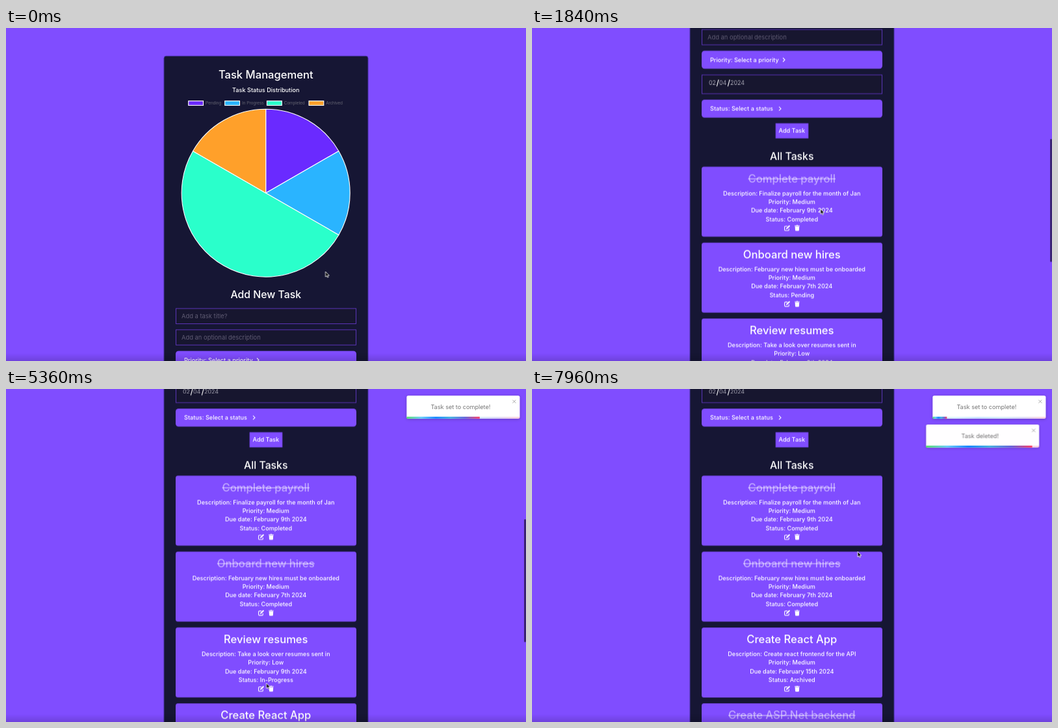
These frames come from a looping animation (800x514 px, 8000 ms). An HTML page:

```html
<!DOCTYPE html>
<html lang="en">
<head>
<meta charset="utf-8">
<title>Task Management</title>
<style>
  html, body { margin: 0; width: 100%; height: 100%; overflow: hidden; background: #804dff; }
  svg { display: block; width: 100vw; height: 100vh; }
  text { font: 500 9.15px Inter, sans-serif; fill: #fff; }
  .mid { text-anchor: middle; }
  .h1 { font-size: 16.6px; }
  .h2 { font-size: 15.8px; }
  .name { font-size: 16.6px; }
  .done { fill-opacity: .5; text-decoration: line-through; text-decoration-thickness: 1px; }
  .hint { font-size: 9.4px; font-weight: 400; fill: #5f5b73; }
  .date { font-size: 8.9px; font-weight: 400; fill: #a3a2b0; }
  .slash { font-size: 12px; }
  .legend { font: 6.6px "Liberation Sans", sans-serif; fill: #626270; }
  .ask { font: 7.9px "Liberation Sans", sans-serif; fill: #333; }
  .act { font: 8px "Liberation Sans", sans-serif; fill: #1a73e8; }
  .bold { font-weight: 700; }
  .note { fill: #757575; font-weight: 400; }
  .field { fill: #17162f; stroke: #5a34b6; }
  .fill { fill: #804dff; }
</style>
</head>
<body>
<svg id="stage" viewBox="0 0 800 514" preserveAspectRatio="none"></svg>
<script>
const LOOP = 8000;
const HOLD = 'steps(1)';
const PANEL = '#161634';

const text = (x, y, str, cls = '') => `<text x="${x}" y="${y}" class="${cls}">${str}</text>`;
const mid = (y, str, cls = '') => text(399.8, y, str, 'mid ' + cls);
const rect = (x, y, w, h, attrs = '') =>
  `<rect x="${x}" y="${y}" width="${w}" height="${h}" ${attrs}/>`;
const group = (id, body) => `<g id="${id}">${body}</g>`;
const at = (x, y, body) => `<g transform="translate(${x} ${y})">${body}</g>`;

// Chart
const slices = [
  ['Pending', 1, '#6a2aff', 280.7],
  ['In Progress', 1, '#2ab4ff', 336.7],
  ['Completed', 3, '#2affcb', 401.5],
  ['Archived', 1, '#ffa02a', 466]
];

function chart() {
  const r = 129.5;
  let sum = 0, out = '';
  const point = n => {
    const a = n * Math.PI / 3;
    return `${r * Math.sin(a)} ${-r * Math.cos(a)}`;
  };
  for (const [label, n, color, x] of slices) {
    out += rect(x, 112.6, 22.8, 6.8, `fill="${color}" stroke="#fff" stroke-width="1.1"`);
    out += text(x + 26.2, 118.3, label, 'legend');
    out += at(399.7, 254.7, `<path d="M0 0L${point(sum)}A${r} ${r} 0 0 1 ${point(sum + n)}Z"
      fill="${color}" stroke="#fff" stroke-width="1.1" stroke-linejoin="round"/>`);
    sum += n;
  }
  return out;
}

// Form
const chevron = (x, y) =>
  `<path d="M${x} ${y - 3}l3 3l-3 3" fill="none" stroke="#fff" stroke-width="1.1"/>`;
const picker = (y, label, x) =>
  rect(261, y, 278, 27.8, 'rx="4.5" class="fill"') + text(274, y + 17, label) + chevron(x, y + 14);
const field = (y, h) => rect(261.5, y, 277, h, 'class="field"');

const form = () =>
  mid(417, 'Add New Task', 'h2') +
  field(433, 23.5) + text(270, 447.8, 'Add a task title?', 'hint') +
  field(465.8, 23.5) + text(270, 480.7, 'Add an optional description', 'hint') +
  picker(498.5, 'Priority: Select a priority', 386) +
  field(535.8, 29) +
  text(272, 550.9, '02', 'date') + text(283.6, 551.8, '/', 'slash') +
  text(288, 550.9, '04', 'date') + text(300.5, 551.8, '/', 'slash') +
  text(305, 550.9, '2024', 'date') +
  picker(573.9, 'Status: Select a status', 380) +
  rect(375, 610.8, 50, 22.6, 'class="fill" stroke="#6a40d8" stroke-width=".8"') +
  mid(625.3, 'Add Task');

// Task cards
const icons =
  `<g transform="translate(392.5 94.5)">
    <path d="M.5-2.8H-2.6Q-3.9-2.8-3.9-1.5V2.6Q-3.9 3.9-2.6 3.9H1.5Q2.8 3.9 2.8 2.6V.8"
      fill="none" stroke="#fff" stroke-width="1.1"/>
    <path d="M-1.6 1.8L-1.2-.1L2.6-3.9Q3.3-4.6 4-3.9Q4.8-3.1 4.1-2.4L.3 1.4Z" fill="#fff"/>
  </g>
  <path transform="translate(407.9 94.5)" fill="#fff" d="M-3.8-3.8H-1.4L-1-4.5H1L1.4-3.8H3.8V-2.7H-3.8Z
    M-3.3-2.1H3.3L2.9 3.7Q2.8 4.5 2 4.5H-2Q-2.8 4.5-2.9 3.7Z"/>`;

function card(slot, name, about, priority, due, status) {
  const lines = [
    'Description: ' + about, 'Priority: ' + priority,
    `Due date: February ${due} 2024`, 'Status: ' + status
  ];
  return at(0, 677.6 + 117.1 * slot,
    rect(261, 0, 278, 108, 'rx="3.5" class="fill"') +
    mid(24, name, status === 'Completed' ? 'name done' : 'name') +
    lines.map((line, i) => mid(44 + 13.4 * i, line)).join('') + icons);
}

const hires = status =>
  card(1, 'Onboard new hires', 'February new hires must be onboarded', 'Medium', '7th', status);

const cards = () =>
  mid(666.7, 'All Tasks', 'h2') +
  card(0, 'Complete payroll', 'Finalize payroll for the month of Jan', 'Medium', '9th', 'Completed') +
  group('open', hires('Pending')) +
  group('closed', hires('Completed')) +
  group('review', card(2, 'Review resumes', 'Take a look over resumes sent in', 'Low', '9th', 'In-Progress')) +
  group('rest',
    card(3, 'Create React App', 'Create react frontend for the API', 'Medium', '15th', 'Archived') +
    card(4, 'Create ASP.Net backend', 'Create backend for the app', 'Medium', '8th', 'Completed'));

// Overlays
const toast = (id, y, str) => group(id, at(616.4, y,
  rect(0, 0, 174, 35.5, 'rx="2.5" fill="#fff" filter="url(#shadow)"') +
  text(83, 20.7, str, 'mid note') +
  '<path d="M163 6.6l5 5m0-5l-5 5" stroke="#aaa" stroke-width="1"/>' +
  rect(0, 32.7, 174, 2.8, 'fill="url(#rainbow)" opacity=".2"') +
  rect(0, 32.7, 174, 2.8, `fill="url(#rainbow)" id="${id}Bar"`)));

const dialog = () =>
  rect(0, 0, 800, 514, 'fill="#000" opacity=".43"') +
  rect(277.3, 208, 245.4, 55, 'rx="4" fill="#fff" filter="url(#shadow)"') +
  rect(277.3, 240.5, 245.4, 1, 'fill="#dcdce0"') +
  text(291, 227.9, 'Are you sure you wish to delete this task?', 'ask') +
  text(456, 255, 'Cancel', 'act') + text(496.8, 255, 'OK', 'act bold');

const rainbow = ['#4cd964', '#5ac8fa', '#007aff', '#34aadc', '#5856d6', '#ff2d55']
  .map((c, i) => `<stop offset="${i / 5}" stop-color="${c}"/>`).join('');

document.getElementById('stage').innerHTML =
  `<defs>
    <linearGradient id="rainbow">${rainbow}</linearGradient>
    <linearGradient id="fade" x2="0" y2="1">
      <stop stop-color="#000" stop-opacity="0"/><stop offset="1" stop-color="#000" stop-opacity=".14"/>
    </linearGradient>
    <filter id="shadow" x="-10%" y="-30%" width="120%" height="170%">
      <feDropShadow dx="0" dy="1" stdDeviation="2" flood-opacity=".25"/>
    </filter>
  </defs>` +
  rect(0, 0, 800, 514, 'class="fill"') +
  group('page',
    rect(243, 43.3, 314, 1340, `rx="3.5" fill="${PANEL}" stroke="#43309a" stroke-width="1"`) +
    mid(78, 'Task Management', 'h1') + mid(98.7, 'Task Status Distribution') +
    chart() + form() + cards()) +
  rect(0, 502, 800, 12, 'fill="url(#fade)"') +
  group('bar', rect(797, 0, 3, 189.5, 'rx="1" fill="#000" opacity=".55"')) +
  toast('saved', 10.2, 'Task set to complete!') +
  toast('removed', 54.8, 'Task deleted!') +
  group('dialog', dialog()) +
  group('cursor', `<path d="M0 0V8.2L1.9 6.5L3.1 9.2L4.5 8.6L3.3 6H5.8Z"
    fill="#111" stroke="#fff" stroke-width=".8"/>`);

// Motion: rows are [ms, properties, easing to the next row]
function play(id, rows) {
  const frames = rows.filter(row => row[0] <= LOOP)
    .map(([ms, props, easing = 'linear']) => ({ ...props, offset: ms / LOOP, easing }));
  const last = frames[frames.length - 1];
  if (last.offset < 1) frames.push({ ...last, offset: 1 });
  document.getElementById(id).animate(frames, { duration: LOOP, iterations: Infinity }).startTime = 0;
}
const move = (x, y) => ({ transform: `translate(${x}px, ${y}px)` });
const show = opacity => ({ opacity });
const swap = (id, ms, from, to) => play(id, [[0, from, HOLD], [ms, to]]);

const scroll = [
  [0, 0], [200, 0, 'ease-in'], [520, 60], [1120, 271.3], [1440, 400, 'ease-out'],
  [1680, 463.4], [4440, 463.4, 'ease-in-out'], [5080, 543.7]
];
play('page', scroll.map(([ms, y, ease]) => [ms, move(0, -y), ease]));
play('bar', scroll.map(([ms, y, ease]) => [ms, move(0, y * .37), ease]));
play('bar', [[0, show(0), HOLD], [200, show(1), HOLD], [6200, show(0)]]);

play('cursor', [
  [0, move(491.5, 376)], [1620, move(491.5, 376), 'ease-in'],
  [1840, move(444, 279), 'ease-out'], [2440, move(386.5, 349)],
  [4960, move(386.5, 349), 'ease-in-out'], [5360, move(400.5, 454), 'ease-out'],
  [5600, move(405.5, 459)], [6380, move(405.5, 459), 'ease-in-out'],
  [6960, move(491.5, 260.5), 'ease-out'], [7220, move(501, 251)]
]);

swap('open', 3500, show(1), show(0));
swap('closed', 3500, show(0), show(1));
swap('review', 7574, show(1), show(0));
swap('rest', 7574, move(0, 0), move(0, -117.1));

play('dialog', [
  [0, show(0)], [6200, show(0)], [6320, show(1)], [7360, show(1)], [7480, show(0)]
]);

function popIn(id, start) {
  const ease = 'cubic-bezier(.215, .61, .355, 1)';
  const step = (ms, x, opacity = 1) => [start + ms, { ...move(x, 0), opacity }, ease];
  play(id, [
    [0, { ...move(1632, 0), opacity: 0 }, HOLD],
    step(0, 1632, 0), step(420, -13.6), step(525, 5.4), step(630, -2.7), step(700, 0)
  ]);
  const run = start + 80;
  const scale = x => ({ transform: `scaleX(${x})` });
  // The bar's own left edge is the scaling origin
  document.getElementById(id + 'Bar').style.transformOrigin = '0 0';
  play(id + 'Bar', [[0, scale(1)], [run, scale(1)], [LOOP, scale(1 - (LOOP - run) / 5000)]]);
}
popIn('saved', 3510);
popIn('removed', 7574);
</script>
</body>
</html>
```
